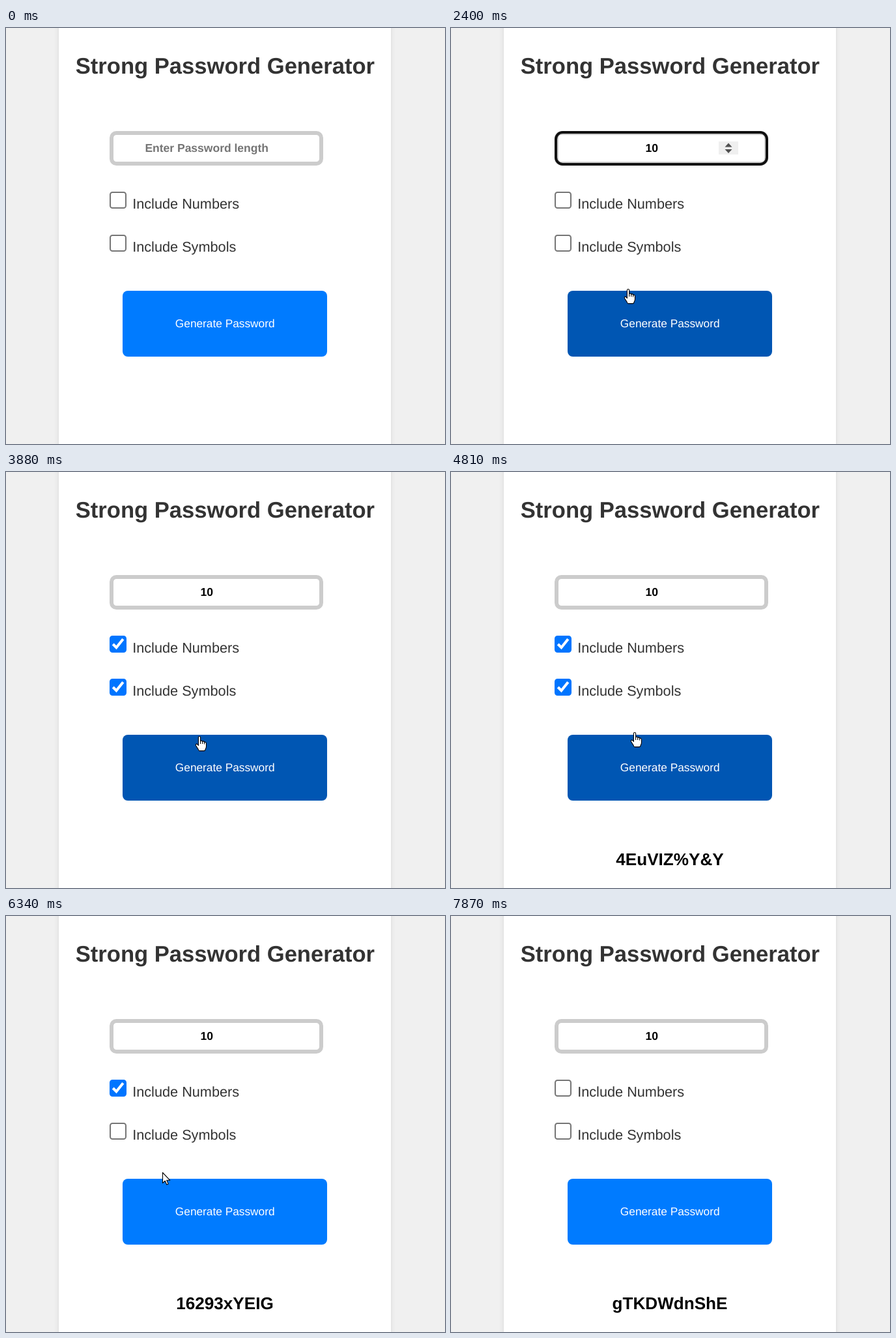
Animation, 674 px wide and 638 px high, one loop 8790 ms. Source, as an HTML page:

```html
<!DOCTYPE html>
<html lang="en">
<head>
<meta charset="utf-8">
<title>Strong Password Generator</title>
<style>
  html, body { margin: 0; width: 100%; height: 100%; overflow: hidden; background: #f0f0f0; }
  svg { position: absolute; left: 0; top: 0; display: block; overflow: hidden; }
  text { font-family: "Liberation Sans", Arial, sans-serif; text-rendering: geometricPrecision; white-space: pre; }
  .card { fill: #fff; filter: drop-shadow(0 0 3.5px rgba(0, 0, 0, .1)); }
  .mid { text-anchor: middle; }
  .bold { font-weight: bold; }
  .title { font-size: 34.6px; fill: #333; }
  .field { font-size: 17.5px; }
  .label { font-size: 21.7px; fill: #333; }
  .press { font-size: 17.3px; fill: #fff; }
  .result { font-size: 26.1px; }
  .tick { fill: none; stroke: #fff; stroke-width: 4.1; }
  .pointer { fill: #fff; stroke: #000; stroke-width: 1.1; stroke-linejoin: round; }
</style>
</head>
<body>
<svg width="674" height="638" viewBox="0 0 674 638">
  <rect class="card" x="81" y="-20" width="510" height="678"/>
  <text class="title bold mid" x="336.4" y="70">Strong Password Generator</text>

  <rect x="162" y="161" width="322" height="47" rx="7.5" fill="#fff" stroke="#ccc" stroke-width="6"/>
  <rect id="ring" x="161" y="160" width="324" height="49" rx="10.5" fill="none" stroke="#101010" stroke-width="4"/>
  <text id="hint" class="field bold mid" x="308.2" y="190" fill="#757575">Enter Password length</text>
  <text id="value" class="field bold mid" x="308.2" y="190"></text>
  <rect id="caret" y="174" width="1" height="20"/>
  <g id="spinner">
    <rect x="411" y="174" width="30" height="20" fill="#efefef"/>
    <path d="M420.5 182.5L426 176.5L431.5 182.5ZM420.5 186L426 192L431.5 186Z" fill="#505050"/>
  </g>

  <g id="numbers" transform="translate(159 251)">
    <rect x="1" y="1" width="24" height="24" rx="3.5" stroke-width="2"/>
    <path class="tick" d="M5.2 13L10.4 18.2L20.8 5.2"/>
  </g>
  <text class="label" x="194.2" y="277">Include Numbers</text>

  <g id="symbols" transform="translate(159 317)">
    <rect x="1" y="1" width="24" height="24" rx="3.5" stroke-width="2"/>
    <path class="tick" d="M5.2 13L10.4 18.2L20.8 5.2"/>
  </g>
  <text class="label" x="194.2" y="343">Include Symbols</text>

  <rect id="button" x="179" y="403" width="314" height="101" rx="8"/>
  <text class="press mid" x="336.2" y="459">Generate Password</text>
  <text id="result" class="result bold mid" x="336" y="603"></text>

  <g id="cursor">
    <path id="arrow" class="pointer" d="M.5 .5V16.6L4.2 13.2L6.8 19L9.2 17.9L6.7 12.3H11.8Z"/>
    <path id="hand" class="pointer" d="M-1.6 2Q-1.6 .5 0 .5Q1.6 .5 1.6 2V8.4Q1.9 7 3.2 7Q4.7 7.2 4.7 8.8Q5 7.8 6.2 7.9Q7.6 8.1 7.7 9.8Q8 9 9 9.2Q10.5 9.6 10.5 11.2V16Q10.5 18 9.2 20Q9 22.6 7 22.6H0Q-1 22.6 -1.8 20.4L-5.5 14.5Q-6.2 13 -5 12.3Q-4 11.8 -3 12.8L-1.6 14.3ZM1.6 8.4V12M4.7 8.8V12M7.7 9.8V12.5"/>
    <path id="beam" d="M-3 -8.5H3M0 -8.5V8.5M-3 8.5H3" fill="none" stroke="#000"/>
  </g>
</svg>
<script>
const LOOP = 8790, STEP = 66.6;
const $ = id => document.getElementById(id);
const show = (id, on) => { $(id).style.display = on ? "" : "none"; };
const between = (k, from, to) => k >= from && k < to;

// Pointer stops: step, x, y; straight runs in between
const stops = [
  [1, 633, 614], [7, 328, 190], [13, 576, 300], [28, 576, 300],
  [36, 272, 400], [41, 200, 412], [47, 166, 262], [50, 171, 327],
  [55, 174, 331], [59, 338, 430], [71, 342, 431], [72, 282, 399],
  [76, 172, 330], [82, 265, 452], [85, 286, 488], [93, 286, 488],
  [98, 172, 250], [104, 172, 262], [107, 213, 392], [112, 310, 455], [117, 572, 632]
];

// Each entry holds from its step onwards
const typed = [[0, ""], [13, "1"], [28, "10"]];
const results = [[0, ""], [62, "4EuVIZ%Y&Y"], [88, "16293xYEIG"], [113, "gTKDWdnShE"]];
const latest = (list, k) => list.filter(e => e[0] <= k).pop();

function pointerAt(k) {
  const i = stops.findIndex(s => s[0] > k);
  if (i < 1) return null;
  const [k0, x0, y0] = stops[i - 1], [k1, x1, y1] = stops[i];
  const f = (k - k0) / (k1 - k0);
  return { x: Math.round(x0 + (x1 - x0) * f), y: Math.round(y0 + (y1 - y0) * f) };
}

// The hot spot sits a little below the drawn tip
const inside = (p, x, y, w, h) => !!p && between(p.x, x, x + w) && between(p.y + 4, y, y + h);

function drawBox(id, on, hover) {
  const [rect, tick] = $(id).children;
  const edge = on ? (hover ? "#005cc8" : "#0075ff") : (hover ? "#4f4f4f" : "#767676");
  rect.setAttribute("fill", on ? edge : "#fff");
  rect.setAttribute("stroke", edge);
  tick.style.display = on ? "" : "none";
}

function draw(k) {
  const p = pointerAt(k);
  const overField = inside(p, 159, 158, 328, 53);
  const overButton = inside(p, 179, 403, 314, 101);
  const focus = between(k, 7, 47);
  const [since, value] = latest(typed, k);

  show("ring", focus);
  show("spinner", focus || overField);
  show("hint", value === "");
  $("value").textContent = value;
  $("caret").setAttribute("x", 308 + 4.5 * value.length);
  show("caret", focus && (k - Math.max(since, 7)) % 15 < 8);

  drawBox("numbers", between(k, 47, 100), inside(p, 159, 251, 26, 26));
  drawBox("symbols", between(k, 53, 77), inside(p, 159, 317, 26, 26));
  $("button").setAttribute("fill", overButton ? "#0056b3" : "#007bff");
  $("result").textContent = latest(results, k)[1];

  show("cursor", p);
  if (!p) return;
  $("cursor").setAttribute("transform", `translate(${p.x} ${p.y})`);
  show("hand", overButton);
  show("beam", overField);
  show("arrow", !overButton && !overField);
}

const start = performance.now();
function tick() {
  const t = (performance.now() - start) % LOOP;
  draw(Math.floor(t / STEP));
  requestAnimationFrame(tick);
}
tick();
</script>
</body>
</html>
```
